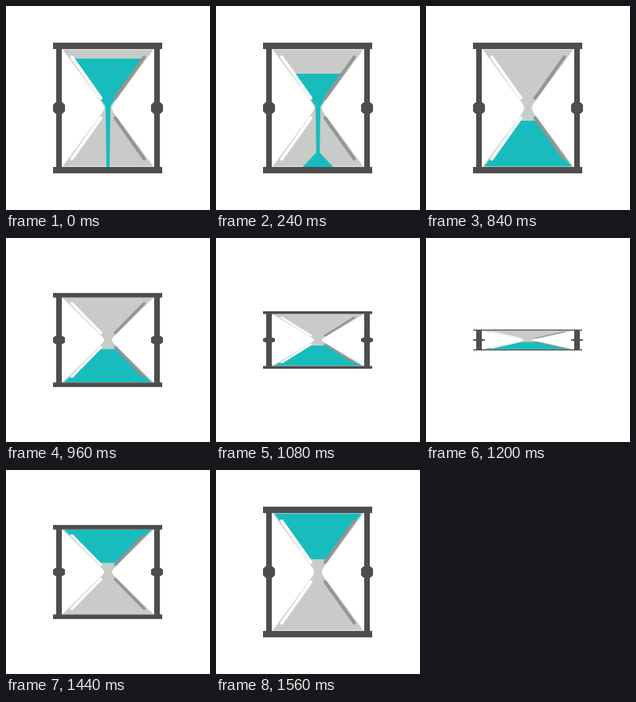
Write an HTML page with a canvas that moves like this. It is 256 by 256 pixels and loops after 1.68 s.

```html
<!DOCTYPE html>
<html>
<head>
<meta charset="utf-8">
<style>
html, body { margin: 0; overflow: hidden; background: #fff; }
canvas { display: block; width: 256px; height: 256px; }
</style>
</head>
<body>
<canvas id="stage" width="256" height="256"></canvas>
<script>
const ctx = document.getElementById('stage').getContext('2d');
const STEP = 120, STEPS = 14, SETTLED = 7, THIN = 10;
const TEAL = '#18bcbd', GLASS = '#c9cbc8', DARK = '#4d4d4d', SHADE = '#929593';

// Fills a shape symmetric about x = cx from [y, halfWidth] pairs.
function fillSymmetric(color, profile, cx = 0) {
  ctx.fillStyle = color;
  ctx.beginPath();
  for (const [y, half] of profile) ctx.lineTo(cx - half, y);
  for (const [y, half] of [...profile].reverse()) ctx.lineTo(cx + half, y);
  ctx.fill();
}

function drawGlass() {
  fillSymmetric(GLASS, [[-73.5, 57], [-5, 6.5], [0, 4.5], [5, 6.5], [73.5, 57]]);
}

function drawFallingSand(step) {
  const level = -62 + 9.5 * step;
  fillSymmetric(TEAL, [[level, 3 - 0.68 * (level + 2)], [-2, 3], [74, 2]]);
  fillSymmetric(TEAL, [[74 - 10.3 * step, 0], [74, 9.6 * step]]);
}

function drawSettledSand() {
  fillSymmetric(TEAL, [[16, 11], [73.5, 55]]);
}

function drawHighlights() {
  ctx.lineWidth = 4;
  ctx.lineCap = 'round';
  for (const side of [-1, 1]) {
    ctx.strokeStyle = side < 0 ? '#fff' : SHADE;
    for (const end of [-1, 1]) {
      ctx.beginPath();
      ctx.moveTo(side * 45.5, end * 64);
      ctx.lineTo(side * 9, end * 12.5);
      ctx.stroke();
    }
  }
}

function drawFrame() {
  ctx.fillStyle = DARK;
  ctx.fillRect(-69, -82, 137, 8);
  ctx.fillRect(-69, 74, 137, 8);
  for (const x of [-61.5, 61.5]) {
    ctx.fillRect(x - 3.5, -75, 7, 150);
    fillSymmetric(DARK, [[-7, 4.5], [-4, 7.5], [4, 7.5], [7, 4.5]], x);
  }
}

function draw(now) {
  const step = Math.floor(now / STEP) % STEPS;
  const squash = step < SETTLED ? 1 : 0.16 + 0.28 * Math.abs(step - THIN);
  ctx.setTransform(1, 0, 0, 1, 0, 0);
  ctx.fillStyle = '#fff';
  ctx.fillRect(0, 0, 256, 256);
  ctx.setTransform(1, 0, 0, step > THIN ? -squash : squash, 128, 128);
  drawGlass();
  if (step < SETTLED) drawFallingSand(step);
  else drawSettledSand();
  drawHighlights();
  drawFrame();
}

function tick() {
  draw(performance.now());
  requestAnimationFrame(tick);
}
tick();
</script>
</body>
</html>
```
